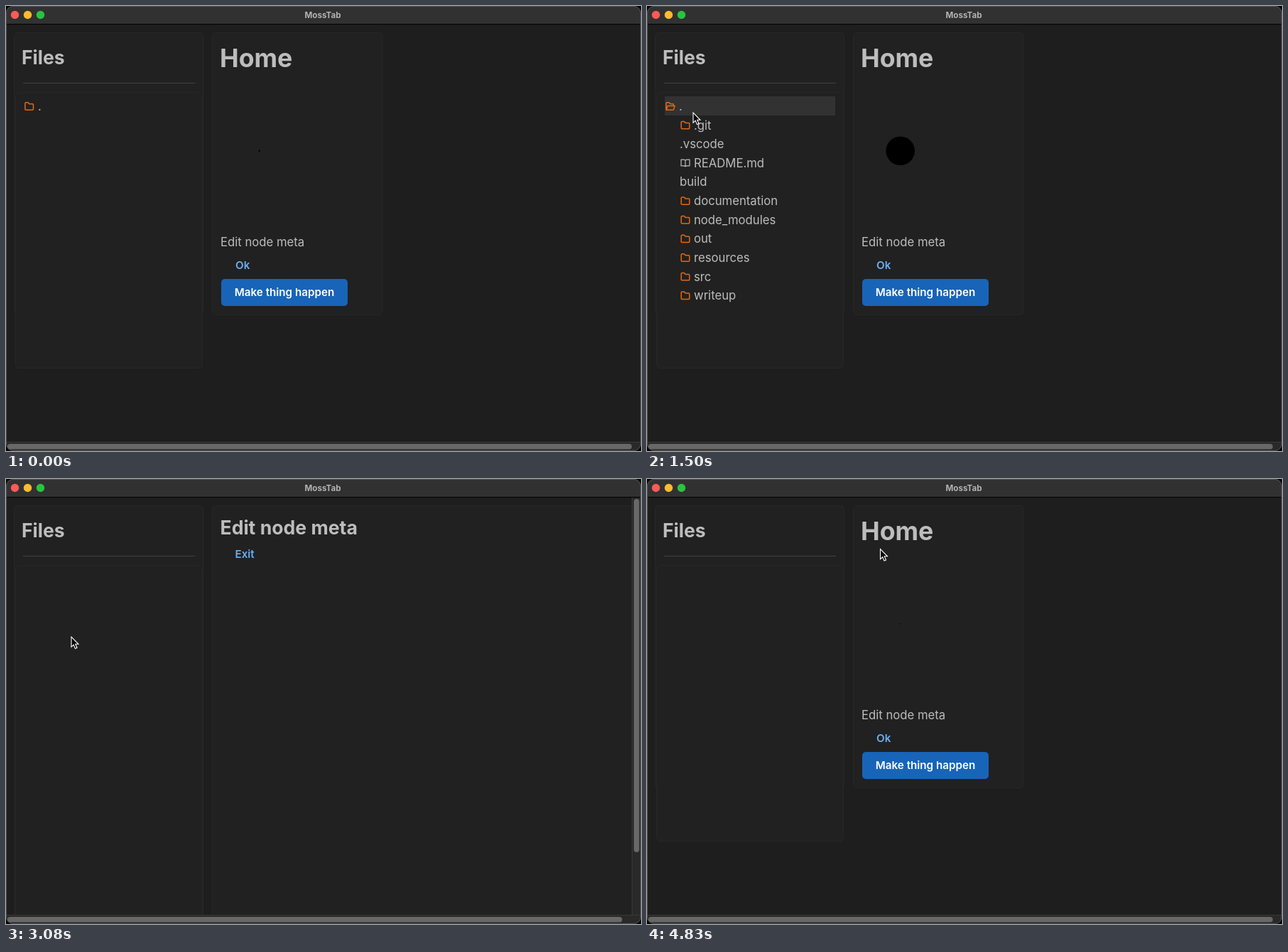
An HTML page for the animation above (4870 ms loop, 894 by 626 pixels).

```html
<!DOCTYPE html>
<html lang="en">
<head>
<meta charset="utf-8">
<title>MossTab</title>
<style>
  html, body { margin: 0; width: 100%; height: 100%; overflow: hidden; background: #000; }
  svg { display: block; font: 16.7px Inter, "Liberation Sans", sans-serif; fill: #bdbdbd; }
  .panel { fill: #212121; stroke: #272727; }
  .h1 { font-size: 35.7px; font-weight: 700; }
  .h2 { font-size: 26.6px; font-weight: 700; }
  .button { font-size: 15.2px; font-weight: 600; }
  .link { fill: #6aaff3; }
  .track { fill: #292929; stroke: #393939; }
  .thumb { fill: #686868; }
  .icon { fill: none; stroke: #e0691a; stroke-width: 1.5; stroke-linejoin: round; }
  .book { stroke: #bdbdbd; stroke-width: 1.2; }
</style>
</head>
<body>
<svg width="894" height="626" viewBox="0 0 894 626">
  <defs>
    <clipPath id="window"><rect width="894" height="626" rx="10"/></clipPath>
    <path id="folder" class="icon" d="M-5.8 4V-4Q-5.8-5.2-4.6-5.2H-1.6L.2-3.2H4.6Q5.8-3.2 5.8-2V4Q5.8 5.2 4.6 5.2H-4.6Q-5.8 5.2-5.8 4Z"/>
    <path id="open" class="icon" d="M-5.8 4.6V-4Q-5.8-5.2-4.6-5.2H-1.6L.2-3.2H3.6Q4.6-3.2 4.6-2V-.8M-5.6 5.2L-3.6-.6H6.4L4.8 4.4Q4.5 5.2 3.6 5.2Z"/>
    <path id="book" class="icon book" d="M0-3.6Q-.6-4.8-2-4.8H-6V4H-2Q-.6 4 0 5Q.6 4 2 4H6V-4.8H2Q.6-4.8 0-3.6V5"/>
  </defs>
  <g clip-path="url(#window)">
    <rect width="894" height="626" fill="#1e1e1e"/>

    <g id="home">
      <rect class="panel" x="11.5" y="37.5" width="266" height="397" rx="5"/>
      <rect class="panel" x="13.5" y="121.5" width="263" height="388" rx="5"/>
      <rect x="14" y="425" width="262" height="20" fill="#212121"/>
      <rect class="panel" x="290.5" y="37.5" width="239.5" height="397" rx="5"/>
      <text class="h1" x="301" y="86">Home</text>
      <circle id="node" cx="356.7" cy="203.8" fill="#000"/>
      <text x="302" y="338">Edit node meta</text>
      <text class="button link" x="323" y="369.5">Ok</text>
      <rect x="303" y="384" width="178" height="38" rx="5" fill="#1864b8"/>
      <text class="button" x="392" y="408" text-anchor="middle" fill="#fff">Make thing happen</text>
      <rect class="track" x="-1" y="613.5" width="896" height="14"/>
      <rect class="thumb" x="2" y="616" width="879" height="7.5" rx="3.75"/>
    </g>

    <g id="editor">
      <rect class="panel" x="11.5" y="37.5" width="266" height="600" rx="5"/>
      <rect class="panel" x="13.5" y="121.5" width="263" height="600" rx="5"/>
      <rect class="panel" x="290.5" y="37.5" width="620" height="600" rx="5"/>
      <text class="h2" x="301.5" y="78">Edit node meta</text>
      <text class="button link" x="322.5" y="111">Exit</text>
      <rect class="track" x="881.5" y="20" width="14" height="608"/>
      <rect class="track" x="-1" y="613.5" width="896" height="14"/>
      <rect class="thumb" x="884" y="28" width="7.5" height="497" rx="3.75"/>
      <rect class="thumb" x="2" y="616" width="865.5" height="7.5" rx="3.75"/>
    </g>

    <text class="h2" x="22" y="82">Files</text>
    <path d="M24 108.5H266.5" stroke="#404040"/>

    <g id="root">
      <rect id="focus" x="25" y="127" width="240" height="27" fill="#323232"/>
      <use id="rootIcon" x="32.7" y="141"/>
      <text x="45" y="147">.</text>
    </g>
    <g id="tree"></g>

    <rect width="894" height="25" fill="#313131"/>
    <rect y="25" width="894" height="1.2" fill="#050505"/>
    <circle cx="12.5" cy="12.5" r="5.7" fill="#fb5a55"/>
    <circle cx="30.5" cy="12.5" r="5.7" fill="#fcbb2f"/>
    <circle cx="48.5" cy="12.5" r="5.7" fill="#29c43f"/>
    <text x="446" y="16.5" text-anchor="middle" font-size="11.6" font-weight="700" fill="#b2b2b2">MossTab</text>
    <path id="cursor" d="M0 0V14.2L3.2 11.2L5.5 16.6L8 15.5L5.7 10.3H10Z" fill="#000" stroke="#fff" stroke-width="1.1"/>
  </g>
  <rect x=".5" y=".5" width="893" height="625" rx="9.5" fill="none" stroke="#525252"/>
</svg>
<script>
const LOOP = 4870, OPEN = 1340, EDIT = 2900, EDIT_LOADED = 3120, HOME = 4790;
const el = id => document.getElementById(id);
const show = (id, on) => el(id).setAttribute("visibility", on ? "visible" : "hidden");
const clamp = p => Math.min(1, Math.max(0, p));
const smooth = p => p * p * (3 - 2 * p);
const cubic = p => p < .5 ? 4 * p ** 3 : 1 - 4 * (1 - p) ** 3;

const files = [
  ["folder", ".git"], ["", ".vscode"], ["book", "README.md"], ["", "build"],
  ["folder", "documentation"], ["folder", "node_modules"], ["folder", "out"],
  ["folder", "resources"], ["folder", "src"], ["folder", "writeup"]
];
el("tree").innerHTML = files.map(([icon, name], i) => {
  const y = 167.6 + i * 26.63;
  return (icon && `<use href="#${icon}" x="54" y="${y}"/>`) +
    `<text x="${icon ? 66 : 46}" y="${y + 6}">${name}</text>`;
}).join("");

// Cursor stops: time, x, y
const stops = [
  [330, 78, 537], [940, 65, 215], [980, 65, 215], [1240, 65, 150], [1640, 65, 150],
  [2300, 92, 222.5], [3120, 92, 222], [3570, 286, 194], [3750, 291, 195], [4150, 328.5, 98.5], [LOOP, 328.5, 98.5]
];

function cursorAt(t) {
  const i = Math.max(1, stops.findIndex(s => s[0] > t));
  const [t0, x0, y0] = stops[i - 1], [t1, x1, y1] = stops[i];
  const p = smooth(clamp((t - t0) / (t1 - t0)));
  return [x0 + (x1 - x0) * p, y0 + (y1 - y0) * p];
}

function draw(now) {
  const t = now % LOOP;
  const editing = t >= EDIT && t < HOME;
  const open = t >= OPEN && t < EDIT;
  show("home", !editing);
  show("editor", editing);
  show("root", t < EDIT || (t >= EDIT_LOADED && t < HOME));
  show("tree", open);
  el("focus").setAttribute("opacity", open ? 1 : 0);
  el("rootIcon").setAttribute("href", open ? "#open" : "#folder");
  const radius = t >= HOME ? .8 : Math.max(1.3, 20.8 * cubic(clamp((t - 212) / 1574)));
  el("node").setAttribute("r", radius);
  show("cursor", t >= 330);
  el("cursor").setAttribute("transform", `translate(${cursorAt(t)})`);
  requestAnimationFrame(draw);
}
draw(performance.now());
</script>
</body>
</html>
```
